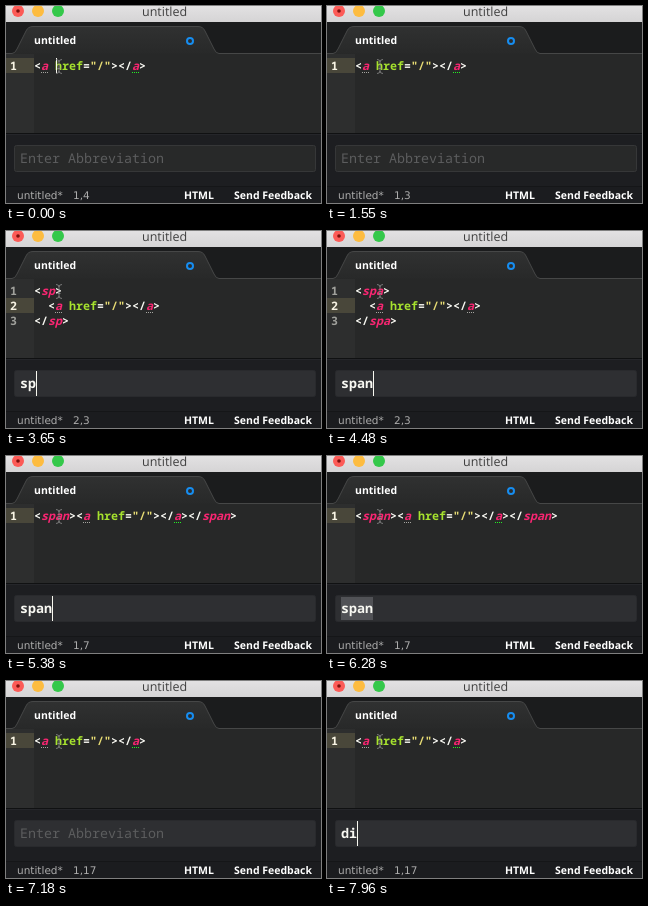
Recreate the animation shown at these times as an HTML page. Size 315x197 px, loop 8000 ms.

```html
<!DOCTYPE html>
<html lang="en">
<head>
<meta charset="utf-8">
<title>Wrap with abbreviation</title>
<style>
  html, body { margin: 0; width: 100%; height: 100%; overflow: hidden; background: #1d1e20; }
  svg { display: block; width: 315px; height: 197px; }
  text { white-space: pre; text-rendering: geometricPrecision; }
  .code { font: 600 11.667px "Noto Sans Mono", "DejaVu Sans Mono", monospace; }
  .tag { font-style: italic; }
  .entry { font: 600 13.333px "Noto Sans Mono", "DejaVu Sans Mono", monospace; fill: #f8f8f2; }
  .entry.empty { font-weight: 400; fill: #5c5d5e; }
  .status { font: 10.5px "DejaVu Sans", sans-serif; fill: #acacac; }
  .label { font: 700 10.5px "Open Sans", sans-serif; fill: #fff; }
  .title { font: 12.5px "Open Sans", sans-serif; fill: #404040; }
</style>
</head>
<body>
<svg viewBox="0 0 315 197">
  <defs>
    <linearGradient id="bar" x2="0" y2="1">
      <stop stop-color="#e2e1e2"/><stop offset="1" stop-color="#d5d4d5"/>
    </linearGradient>
    <linearGradient id="tab" x2="0" y2="1">
      <stop stop-color="#303131"/><stop offset="1" stop-color="#282929"/>
    </linearGradient>
  </defs>

  <rect width="315" height="16" fill="url(#bar)"/>
  <circle cx="12" cy="5" r="6" fill="#fc5b57"/>
  <circle cx="12" cy="5" r="1.800" fill="#7c100d"/>
  <circle cx="32" cy="5" r="6" fill="#fdbc40"/>
  <circle cx="52" cy="5" r="6" fill="#34c84a"/>
  <text class="title" x="136" y="10">untitled</text>

  <rect y="16" width="315" height="32" fill="#1b1c1d"/>
  <rect y="47" width="315" height="80" fill="#272828"/>
  <rect y="48" width="28" height="79" fill="#2d2e2e"/>
  <path d="M0 47.500H6Q9 47.500 11 43L20 25Q22 20.500 27 20.500H192Q197 20.500 199 25L208 43Q210 47.500 213 47.500H315"
        fill="url(#tab)" stroke="#464747"/>
  <text class="label" x="28" y="38">untitled</text>
  <circle cx="184" cy="35" r="3" fill="none" stroke="#168df0" stroke-width="2"/>

  <g id="editor"></g>
  <rect id="editorCaret" y="52" width="1" height="15" fill="#f8f8f0"/>
  <path d="M50 53.500Q53 53.500 53 56V65Q53 67.500 50 67.500M56 53.500Q53 53.500 53 56M53 65Q53 67.500 56 67.500M51.500 62.500H54.500"
        fill="none" stroke="#8c8c8c" opacity=".8"/>

  <rect y="127" width="315" height="54" fill="#1d1e21"/>
  <path d="M0 127.500H315" stroke="#101112"/>
  <path d="M0 128.500H315" stroke="#25262a"/>
  <rect id="field" x="8.500" y="139.500" width="301" height="26" rx="2"/>
  <rect id="selection" x="14" y="141" width="32" height="23" fill="#515256"/>
  <text id="entry" x="14" y="157"></text>
  <rect id="entryCaret" y="140" width="1" height="25" fill="#f8f8f0"/>

  <rect y="181" width="315" height="16" fill="#1b1c1f"/>
  <path d="M0 180.500H315" stroke="#151618"/>
  <text class="status" x="11" y="193">untitled*</text>
  <text id="position" class="status" x="67" y="193"></text>
  <text class="label" x="178" y="193">HTML</text>
  <text class="label" x="228" y="193">Send Feedback</text>
</svg>
<script>
const DURATION = 8000, CHAR = 7, ENTRY_CHAR = 8, LEFT = 28, LINE = 15;
const LINK = '<a href="/"></a>';
const COLORS = { tag: '#f92672', attr: '#a6e22e', string: '#e6db74', plain: '#f8f8f2' };
const TOKEN = /(<\/?)(\w+)|(\w+)(?==)|("[^"]*")|[=>]/g;
const $ = id => document.getElementById(id);

const wrap = tag => [`<${tag}>${LINK}</${tag}>`];
const block = tag => [`<${tag}>`, `  ${LINK}`, `</${tag}>`];

// Each step changes only the listed properties at its start time.
const steps = [
  [0, { lines: [LINK], row: 0, pos: '1,4', codeCaret: 50, focus: false, entry: '', caret: false, selected: false }],
  [300, { pos: '1,3', codeCaret: 42 }],
  [780, { codeCaret: null }],
  [1190, { codeCaret: 42 }],
  [1550, { codeCaret: null }],
  [1910, { focus: true, caret: true }],
  [2210, { caret: false }],
  [2570, { caret: true }],
  [2750, { entry: 's' }],
  [3050, { lines: wrap('s'), pos: '1,4' }],
  [3230, { caret: false }],
  [3290, { entry: 'sp', caret: true }],
  [3650, { lines: block('sp'), row: 1, pos: '2,3' }],
  [3820, { caret: false }],
  [3880, { entry: 'spa', caret: true }],
  [4180, { lines: block('spa') }],
  [4360, { caret: false }],
  [4480, { entry: 'span', caret: true }],
  [4780, { lines: wrap('span'), row: 0, pos: '1,7' }],
  [4960, { caret: false }],
  [5380, { caret: true }],
  [5740, { caret: false }],
  [6160, { caret: true }],
  [6280, { selected: true }],
  [6700, { entry: '', selected: false }],
  [7000, { lines: [LINK], pos: '1,17' }],
  [7180, { caret: false }],
  [7600, { caret: true }],
  [7840, { entry: 'd' }],
  [7960, { entry: 'di' }]
];

const escapeText = s => s.replace(/</g, '&lt;').replace(/>/g, '&gt;');
const glyphs = (s, x, y, fill, style = '') =>
  `<text class="code ${style}" x="${x}" y="${y}" fill="${fill}">${escapeText(s)}</text>`;

function drawLine(line, index, active, single) {
  const y = 64 + index * LINE;
  let out = active ? `<rect y="${52 + index * LINE}" width="28" height="15" fill="#49473a"/>` : '';
  out += glyphs(String(index + 1), 4, y, active ? '#f8f4e4' : '#a0a19c');
  for (const m of line.matchAll(TOKEN)) {
    const x = LEFT + m.index * CHAR;
    if (!m[2]) {
      out += glyphs(m[0], x, y, m[3] ? COLORS.attr : m[4] ? COLORS.string : COLORS.plain);
      continue;
    }
    const nameX = x + m[1].length * CHAR;
    out += glyphs(m[1], x, y, COLORS.plain) + glyphs(m[2], nameX, y, COLORS.tag, 'tag');
    if (m[2] === 'a') {
      const dots = single && m[1] === '</' ? '#24f024' : '#a5a5a0';
      out += `<path d="M${nameX} ${y + 2.5}h7" stroke="${dots}" stroke-dasharray="1 1"/>`;
    }
  }
  return out;
}

function showCaret(node, x, visible) {
  node.setAttribute('x', x);
  node.style.display = visible ? '' : 'none';
}

function render(state) {
  const { lines, row, codeCaret, focus, entry, caret, selected } = state;
  $('editor').innerHTML = lines.map((s, i) => drawLine(s, i, i === row, lines.length === 1)).join('');
  $('position').textContent = state.pos;
  $('field').setAttribute('fill', focus ? '#2e2f32' : '#282929');
  $('field').setAttribute('stroke', focus ? '#292a2d' : '#363738');
  $('entry').textContent = entry || 'Enter Abbreviation';
  $('entry').setAttribute('class', entry ? 'entry' : 'entry empty');
  $('selection').style.display = selected ? '' : 'none';
  showCaret($('editorCaret'), codeCaret ?? 0, codeCaret !== null);
  showCaret($('entryCaret'), 14 + entry.length * ENTRY_CHAR, caret && !selected);
}

let shown = -1;
function tick() {
  const time = performance.now() % DURATION;
  const current = steps.filter(([start]) => start <= time);
  if (current.length !== shown) {
    shown = current.length;
    render(Object.assign({}, ...current.map(([, change]) => change)));
  }
  requestAnimationFrame(tick);
}
tick();
</script>
</body>
</html>
```
